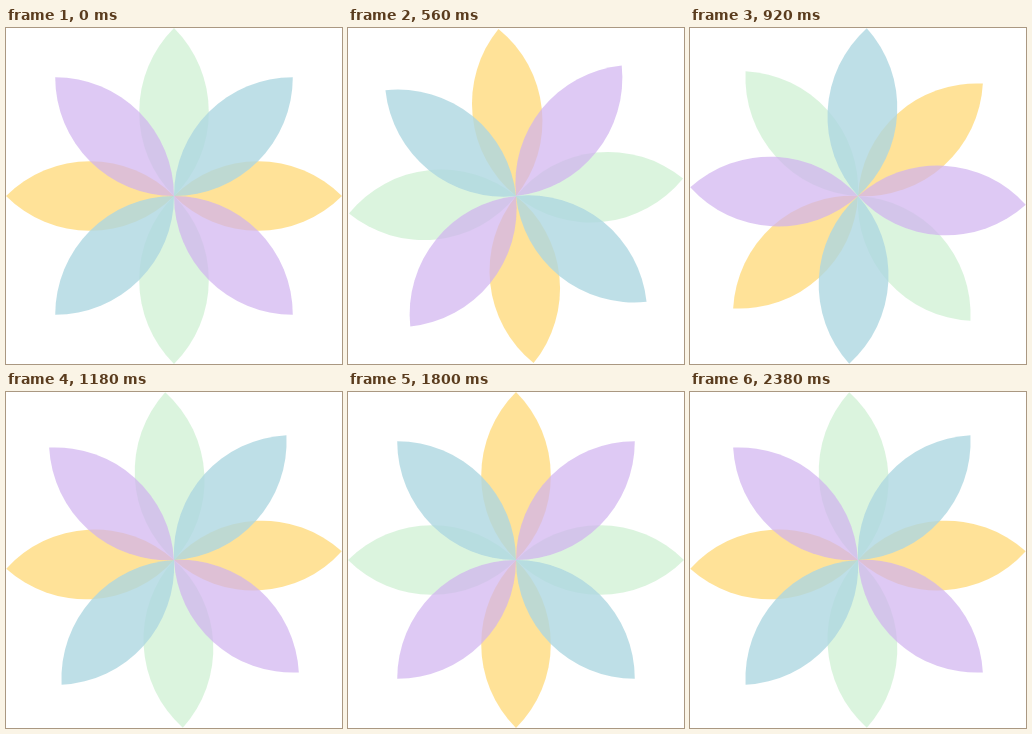
Write an HTML page with a canvas that moves like this. It is 336 px wide and 336 px high and loops after 2.4 s.

```html
<!DOCTYPE html>
<html lang="en">
<head>
<meta charset="utf-8">
<title>Turning flower</title>
<style>
  html, body { margin: 0; width: 100%; height: 100%; overflow: hidden; background: #fff; }
  canvas { display: block; }
</style>
</head>
<body>
<canvas id="stage" width="336" height="336"></canvas>
<script>
const ctx = document.getElementById("stage").getContext("2d");
const CENTER = 168;
const LOOP = 2400;
const STEP = 20;
const SIDE = CENTER / Math.SQRT2;

// Opposite petal pairs, back to front; angle in degrees.
const pairs = [
  { angle: 0, color: "rgba(255, 214, 109, 0.7)" },
  { angle: 90, color: "rgba(204, 239, 208, 0.7)" },
  { angle: 45, color: "rgba(208, 178, 239, 0.7)" },
  { angle: 135, color: "rgba(174, 216, 226, 0.8)" }
];

// A leaf bounded by two quarter circles, from the center outward.
function petal(degrees, color) {
  ctx.save();
  ctx.translate(CENTER, CENTER);
  ctx.rotate((degrees - 45) * Math.PI / 180);
  ctx.beginPath();
  ctx.arc(0, SIDE, SIDE, -Math.PI / 2, 0);
  ctx.arc(SIDE, 0, SIDE, Math.PI / 2, Math.PI);
  ctx.fillStyle = color;
  ctx.fill();
  ctx.restore();
}

function draw(time) {
  const turn = Math.floor((time % LOOP) / STEP) * STEP / LOOP * 360;
  ctx.fillStyle = "#fff";
  ctx.fillRect(0, 0, 2 * CENTER, 2 * CENTER);
  for (const { angle, color } of pairs) {
    petal(angle + turn, color);
    petal(angle + turn + 180, color);
  }
}

let start;
function tick(now) {
  start ??= now;
  draw(now - start);
  requestAnimationFrame(tick);
}
draw(0);
requestAnimationFrame(tick);
</script>
</body>
</html>
```
